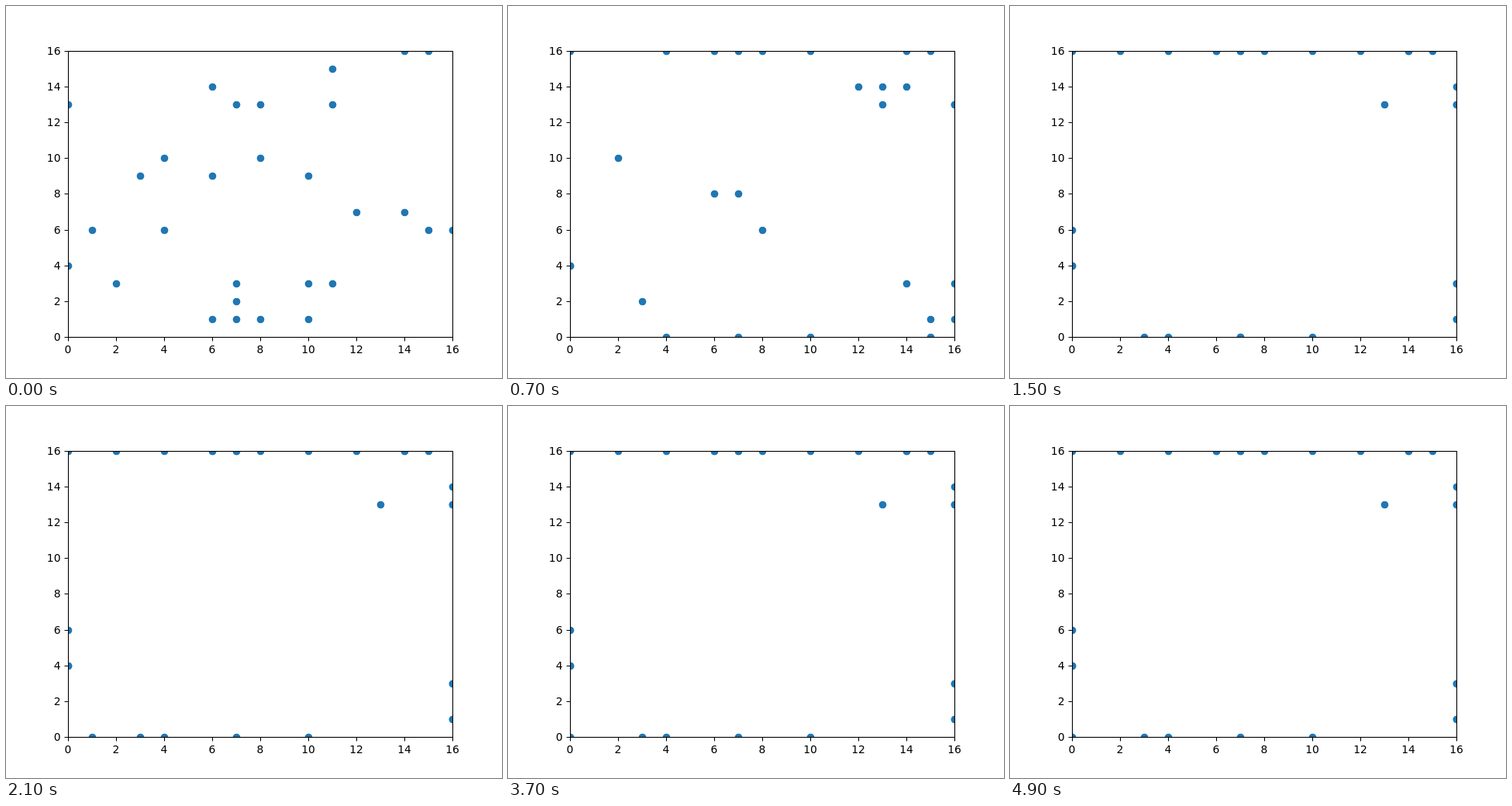
An HTML page that plays this animation: 640 px wide and 480 px high, repeating every 5000 ms.

```html
<!DOCTYPE html>
<html lang="en">
<head>
<meta charset="utf-8">
<title>Moving points</title>
<style>
  html, body { margin: 0; width: 100%; height: 100%; overflow: hidden; background: #fff; }
  svg { display: block; width: 640px; height: 480px; }
  text { font: 13.89px "DejaVu Sans", sans-serif; fill: #000; }
  .line { fill: none; stroke: #000; stroke-width: 1.11; }
  circle { fill: #1f77b4; }
</style>
</head>
<body>
<svg viewBox="0 0 640 480">
  <clipPath id="area"><rect x="80" y="58" width="497" height="370"/></clipPath>
  <g id="dots" clip-path="url(#area)"></g>
  <g id="axes"><rect class="line" x="80.5" y="58.5" width="496" height="369"/></g>
</svg>
<script>
const SIZE = 16, STEP = 100, STEPS = 50;
const NS = 'http://www.w3.org/2000/svg';
const DIRS = { U: [0, 1], D: [0, -1], L: [-1, 0], R: [1, 0] };

const px = x => 80.5 + 31 * x;
const py = y => Math.round(427.2 - 23.1 * y) + 0.5;
const clamp = v => Math.max(0, Math.min(SIZE, v));

function add(parent, tag, attrs, text) {
  const el = document.createElementNS(NS, tag);
  for (const key in attrs) el.setAttribute(key, attrs[key]);
  if (text !== undefined) el.textContent = text;
  return parent.appendChild(el);
}

// Axis ticks and labels
const axes = document.getElementById('axes');
for (let v = 0; v <= SIZE; v += 2) {
  add(axes, 'path', { class: 'line', d: `M${px(v)} 427.5v5M80.5 ${py(v)}h-5` });
  add(axes, 'text', { x: px(v) - 0.5, y: 448, 'text-anchor': 'middle' }, v);
  add(axes, 'text', { x: 70.5, y: py(v) + 4.5, 'text-anchor': 'end' }, v);
}

// Points that run straight until they meet the frame
const straight = {
  U: [[0, 13], [2, 3], [4, 10], [6, 1], [6, 9], [7, 1], [7, 13], [8, 10],
      [10, 9], [12, 7], [14, 7], [14, 16], [15, 16]],
  D: [[3, 9], [4, 6], [7, 2], [10, 3]],
  L: [[0, 4], [15, 6]],
  R: [[6, 14], [7, 3], [8, 1], [10, 1], [11, 3], [11, 13]]
};

// Points that turn: start and one letter per step
const turning = [
  [1, 6, 'LDD'],
  [16, 6, 'D'.repeat(6) + 'L'.repeat(16)],
  [11, 15, 'RRRRRDD'],
  [8, 13, 'RRRRR' + 'LR'.repeat(STEPS / 2)]
];

const points = [...turning];
for (const dir in straight)
  for (const [x, y] of straight[dir]) points.push([x, y, dir.repeat(SIZE)]);

const dots = document.getElementById('dots');
const circles = points.map(() => add(dots, 'circle', { r: 4.86 }));

function place([x, y, path], step) {
  for (const c of path.slice(0, step)) {
    x = clamp(x + DIRS[c][0]);
    y = clamp(y + DIRS[c][1]);
  }
  return [x, y];
}

let shown = -1;
function draw(step) {
  if (step === shown) return;
  shown = step;
  points.forEach((p, i) => {
    const [x, y] = place(p, step);
    circles[i].setAttribute('cx', px(x));
    circles[i].setAttribute('cy', py(y));
  });
}

const start = performance.now();
function tick(now) {
  draw(Math.floor(Math.max(0, now - start) / STEP) % STEPS);
  requestAnimationFrame(tick);
}
draw(0);
requestAnimationFrame(tick);
</script>
</body>
</html>
```
